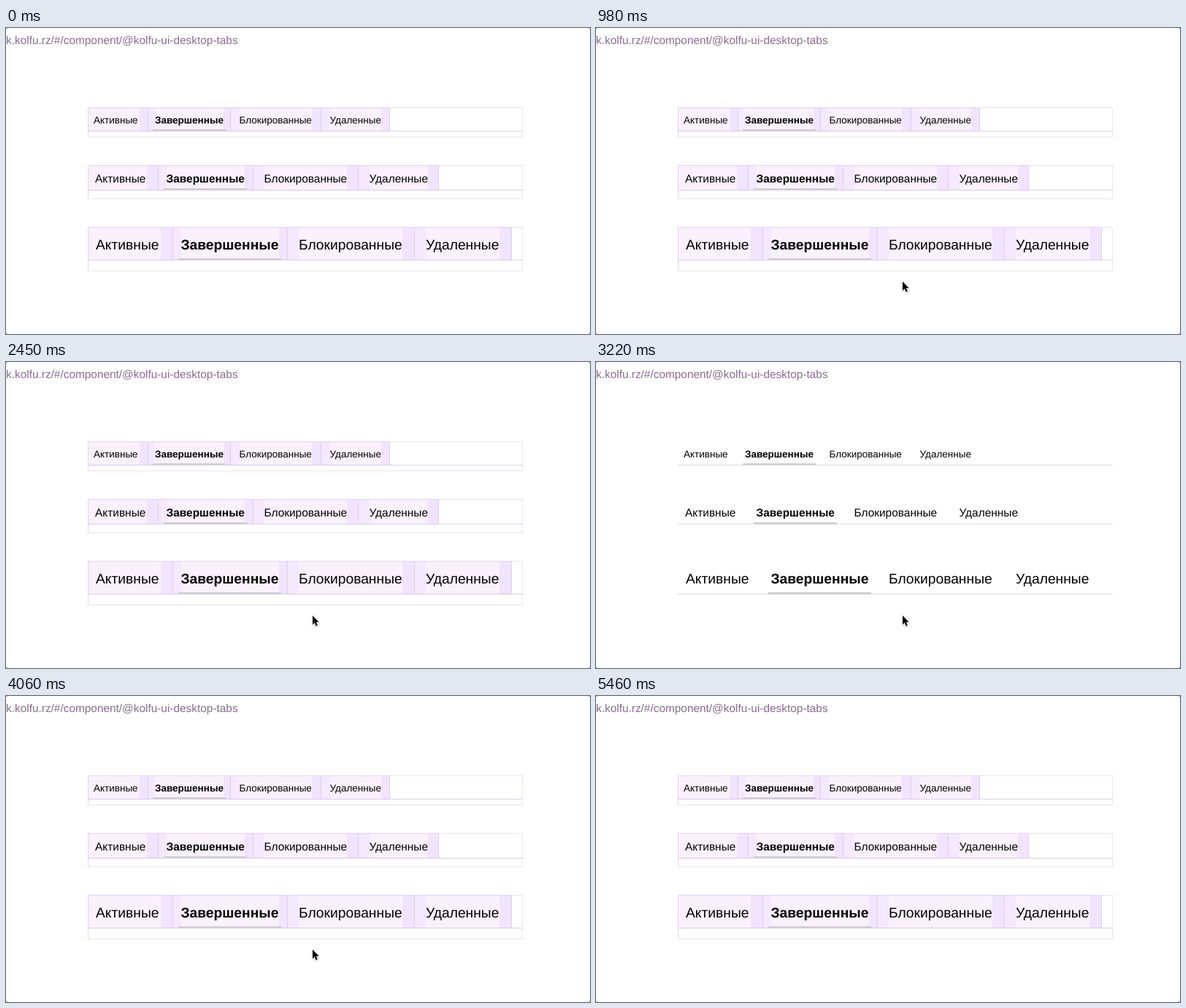
Recreate the animation shown at these times as an HTML page. Size 800x420 px, loop 5530 ms.

```html
<!DOCTYPE html>
<html lang="ru">
<head>
<meta charset="utf-8">
<style>
html, body { margin: 0; width: 100%; height: 100%; overflow: hidden; background: #8d8d8d; }
svg { display: block; width: 800px; height: 420px; background: #fff; border-radius: 3px; }
text { font-family: "Liberation Sans", Arial, sans-serif; text-rendering: geometricPrecision; }
rect { shape-rendering: crispEdges; }
</style>
</head>
<body>
<svg id="stage" viewBox="0 0 800 420">
  <text x="0" y="21.5" font-size="15.4" fill="#8a6c8e">k.kolfu.rz/#/component/@kolfu-ui-desktop-tabs</text>
  <g id="rows"></g>
  <g id="cursor">
    <circle id="ring" cx="-1" cy="-.5" r="21" fill="none" stroke="#888" stroke-width="2"/>
    <path d="M0 0V12.4L2.8 9.8L4.8 14.4L6.8 13.5L4.9 9H8.6Z" stroke="#fff" stroke-width="1.2" paint-order="stroke"
      style="filter:drop-shadow(0 1px 1px #0004)"/>
  </g>
</svg>
<script>
const LOOP = 5530, STEP = 70, LEFT = 112, RIGHT = 708;
const labels = ["Активные", "Завершенные", "Блокированные", "Удаленные"];

// edges: tab borders; text: label starts; ends: where the right padding begins
const rows = [
  { size: 13.5, top: 109, line: 141, bottom: 149, base: 131, bar: [201, 301, 139],
    edges: [112, 194, 307, 431, 526], text: [120, 204, 319.5, 443.5], ends: [183, 298, 419, 514] },
  { size: 15.45, top: 188, line: 222, bottom: 234, base: 212, bar: [216, 330, 220],
    edges: [112, 208, 338, 482, 593], text: [122, 219.5, 353.5, 497.5], ends: [193, 327, 467, 578] },
  { size: 19.25, top: 273, line: 318, bottom: 333, base: 304, bar: [236, 377, 316],
    edges: [112, 228, 385, 559, 693], text: [123, 239.5, 401, 575], ends: [212, 374, 543, 676] }
];

const rect = (x1, y1, x2, y2, fill) =>
  `<rect x="${x1}" y="${y1}" width="${x2 - x1}" height="${y2 - y1}" fill="${fill}"/>`;
const hLine = (x1, x2, y, color) => rect(x1, y, x2, y + 1, color);
const vLine = (x, y1, y2, color) => rect(x, y1, x + 1, y2, color);

function tabBoxes({ top, line, edges, text, ends }) {
  const fills = labels.map((_, i) =>
    rect(edges[i], top, edges[i + 1], line, "#faf1fd")
      + (i ? rect(edges[i], top, Math.round(text[i]), line, "#f4e9fe") : "")
      + rect(ends[i], top, edges[i + 1], line, "#f1e4fe"));
  const borders = edges.slice(1).map((x, i) => vLine(i < 3 ? x : x - 1, top, line, "#dfccf3"));
  return fills.concat(borders).join("") + hLine(LEFT, edges[4], top, "#e6d3f3");
}

function outline({ top, line, bottom, edges }) {
  const pale = "#ebe3f3";
  return hLine(edges[4], RIGHT, top, pale) + hLine(LEFT, RIGHT, bottom, pale)
    + vLine(LEFT, top, bottom, "#e4d5f0") + vLine(RIGHT - 1, top, bottom, pale)
    + hLine(LEFT, RIGHT, line, "#ddd2e6") + hLine(LEFT, edges[4], line, "#dac6ea");
}

document.getElementById("rows").innerHTML = rows.map(row => {
  const [x1, x2, y] = row.bar;
  return `<g class="boxes">${tabBoxes(row)}</g>`
    + hLine(LEFT, RIGHT, row.line, "#dcdcdc")
    + rect(x1, y, x2, row.line + 1, "#d0d0d0")
    + `<g class="boxes">${outline(row)}</g>`
    + labels.map((label, i) => `<text x="${row.text[i]}" y="${row.base}" font-size="${row.size}"`
      + `${i === 1 ? ' font-weight="700"' : ""}>${label}</text>`).join("");
}).join("");

const boxes = document.querySelectorAll(".boxes");
const cursor = document.getElementById("cursor");
const ring = document.getElementById("ring");

// time, x, y of the pointer
const path = [
  [70, 401, 383], [280, 412, 358], [350, 412, 358], [630, 420, 348],
  [4270, 420, 348], [4340, 421, 350], [4410, 424, 362], [4550, 428, 406], [4620, 429, 440]
];

function pointAt(t) {
  const i = path.findIndex(p => p[0] > t);
  if (i < 1) return null;
  const [t0, x0, y0] = path[i - 1], [t1, x1, y1] = path[i];
  const k = (t - t0) / (t1 - t0);
  return [x0 + (x1 - x0) * k, y0 + (y1 - y0) * k];
}

const show = (node, on) => node.style.display = on ? "" : "none";
const within = (t, a, b) => t >= a && t < b;

function draw(now) {
  const t = Math.floor(now % LOOP / STEP) * STEP;
  const plain = within(t, 1610, 2450) || within(t, 3220, 4060);
  boxes.forEach(box => show(box, !plain));
  const point = pointAt(t);
  show(cursor, point);
  if (point) cursor.setAttribute("transform", `translate(${point})`);
  show(ring, within(t, 840, 980));
  requestAnimationFrame(() => draw(performance.now() - begin));
}

const begin = performance.now();
draw(0);
</script>
</body>
</html>
```
